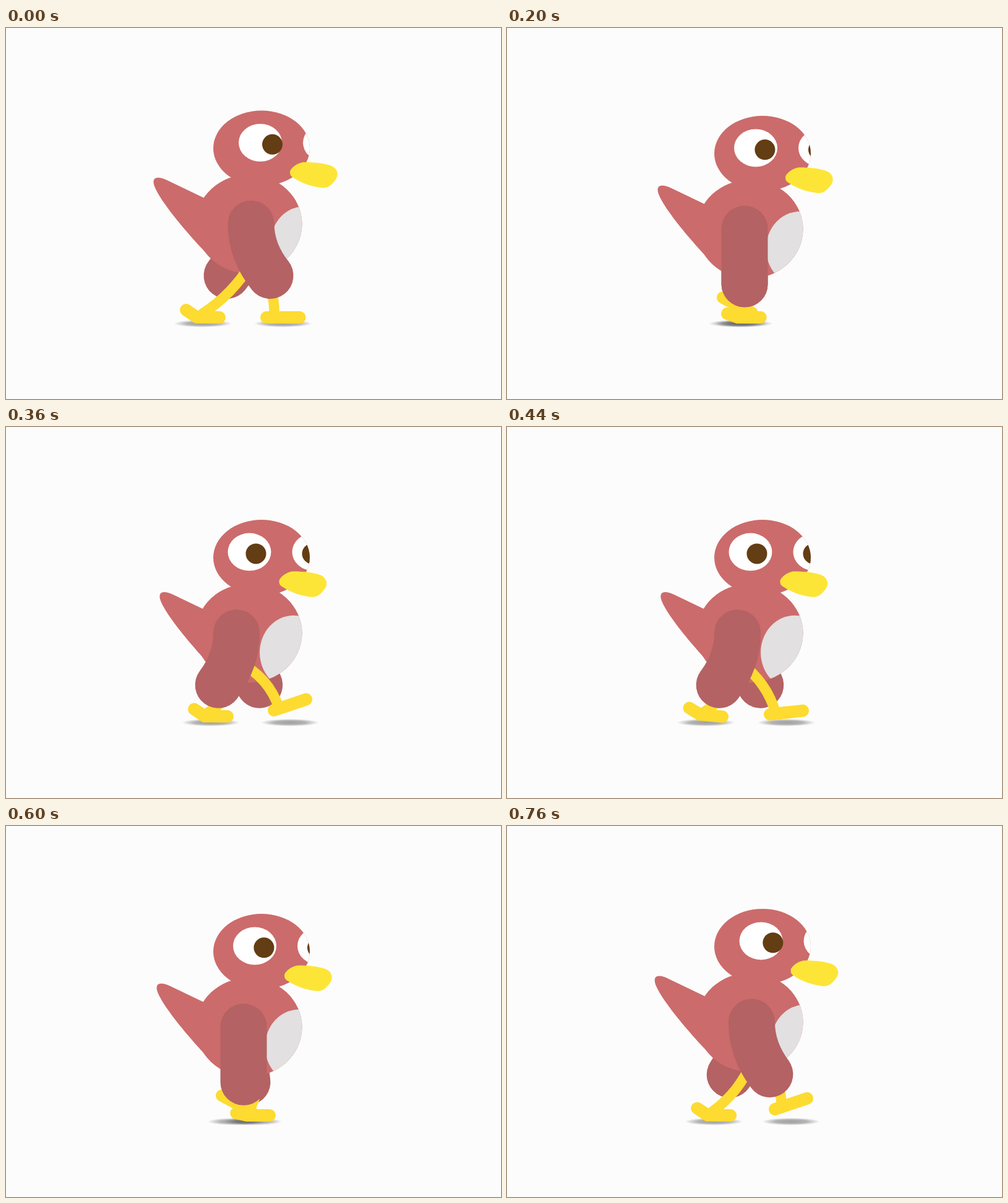
Recreate the animation shown at these times as an HTML page with a canvas. Size 800 px wide and 600 px high, loop 800 ms.

```html
<!DOCTYPE html>
<html lang="en">
<head>
<meta charset="utf-8">
<title>Walking bird</title>
<style>
  html, body { margin: 0; width: 100%; height: 100%; overflow: hidden; background: #fcfcfc; }
  canvas { display: block; }
</style>
</head>
<body>
<canvas id="stage" width="800" height="600"></canvas>
<script>
const ctx = document.getElementById('stage').getContext('2d');
const LOOP = 800, STEP = 40;
const PINK = '#cc6b6b', DARK = '#b46263', YELLOW = '#fddb30', BEAK = '#fde537',
      WHITE = '#fff', BROWN = '#633d13', BELLY = '#e2e0e1';

const tail = new Path2D('M360 294L260 246C245 239 236 241 239 253C245 275 290 330 333 374L370 370Z');
const beak = new Path2D('M459 233C459 227 472 217 482 217C500 217 515 219 526 223C535 227 538 236 534 243' +
  'C529 251 522 259 512 258.5C495 257 478 251 466 243C460 240 459 237 459 233Z');

// Foot poses: heel x, heel y, toe x, toe y, sag of the ball
const FLAT = [421, 468, 474.5, 468, 0];
const PUSH = [291, 456, 345, 468, 8];
const SWING = [
  [0, PUSH],
  [120, [315, 447, 365.5, 469.5, 0]],
  [200, [349, 436, 396, 461, 0]],
  [360, [433, 458, 485, 440.5, 0]],
];

const lerp = (a, b, p) => a + (b - a) * p;
const ease = p => (1 - Math.cos(Math.PI * p)) / 2;

// Smooth interpolation that rests at turning points
function interpolate(keys, t, channel) {
  const time = i => keys[i][0], value = i => keys[i][1][channel];
  const slope = i => {
    if (i === 0 || i === keys.length - 1) return 0;
    const before = value(i) - value(i - 1), after = value(i + 1) - value(i);
    return before * after <= 0 ? 0 : (before + after) / (time(i + 1) - time(i - 1));
  };
  let i = 0;
  while (i < keys.length - 2 && t >= time(i + 1)) i++;
  const span = time(i + 1) - time(i), p = (t - time(i)) / span;
  if (i === keys.length - 2) return lerp(value(i), value(i + 1), p);
  const h = p * p * (3 - 2 * p);
  return lerp(value(i), value(i + 1), h) +
    span * p * (1 - p) * ((1 - p) * slope(i) - p * slope(i + 1));
}

function swingPose(t, duration) {
  const keys = [...SWING, [duration, FLAT]];
  return FLAT.map((_, channel) => interpolate(keys, t, channel));
}

function stancePose(p) {
  return FLAT.map((v, i) => lerp(v, PUSH[i], i === 0 || i === 2 ? p : ease(p)));
}

function ellipse(x, y, rx, ry, color) {
  ctx.beginPath();
  ctx.ellipse(x, y, rx, ry, 0, 0, 2 * Math.PI);
  ctx.fillStyle = color;
  ctx.fill();
}

function shifted(dx, dy, draw) {
  ctx.save();
  ctx.translate(dx, dy);
  draw();
  ctx.restore();
}

function fill(path, color) {
  ctx.fillStyle = color;
  ctx.fill(path);
}

function curve(x0, y0, cx, cy, x1, y1, width, color) {
  ctx.beginPath();
  ctx.moveTo(x0, y0);
  ctx.quadraticCurveTo(cx, cy, x1, y1);
  ctx.lineWidth = width;
  ctx.strokeStyle = color;
  ctx.stroke();
}

function thigh(x, y, reach) {
  const kneeY = y + Math.sqrt(89.5 ** 2 - reach ** 2);
  curve(x, y, x, y + 45, x + reach, kneeY, 75, DARK);
}

function shadow([heelX, , toeX]) {
  shifted((heelX + toeX) / 2, 478, () => {
    ctx.scale(47, 6);
    const g = ctx.createRadialGradient(0, 0, 0, 0, 0, 1);
    g.addColorStop(0, 'rgba(0,0,0,.37)');
    g.addColorStop(0.55, 'rgba(0,0,0,.29)');
    g.addColorStop(1, 'rgba(0,0,0,0)');
    ellipse(0, 0, 1, 1, g);
  });
}

function shinAndFoot([heelX, heelY, toeX, toeY, sag], c) {
  const x = 386 + 10 * c, y = 381;
  const along = (15 + 0.11 * (x - heelX)) / 54;
  const ankleX = lerp(heelX, toeX, along), ankleY = lerp(heelY, toeY, along);
  const dx = ankleX - x, dy = ankleY - y, length = Math.hypot(dx, dy);
  const knee = Math.sqrt(Math.max(0, 53.5 ** 2 - length ** 2 / 4));
  const bulge = Math.max(13, knee) / length;
  curve(x, y, x + dx / 2 + dy * bulge, y + dy / 2 - dx * bulge, ankleX, ankleY, 16.5, YELLOW);

  ctx.beginPath();
  ctx.moveTo(heelX, heelY);
  ctx.lineTo(lerp(toeX, heelX, 0.68), lerp(toeY, heelY, 0.68) + sag);
  ctx.lineTo(toeX, toeY);
  ctx.lineWidth = 20;
  ctx.stroke();
}

function torso(bob) {
  shifted(5.1 * bob, 12.8 * bob, () => fill(tail, PINK));
  shifted(0, 8.4 * bob, () => {
    ellipse(392.5, 317, 86, 80, PINK);
    ctx.clip();
    ellipse(482.6 - 9 * bob, 348.3, 55, 60, BELLY);
  });
}

function head(bob) {
  const turn = -9 * bob;
  shifted(0, 8.5 * bob, () => {
    ctx.save();
    ellipse(413, 194.5, 78, 61, PINK);
    ctx.clip();
    ellipse(515 + turn, 185.5, 35, 30.5, WHITE);
    ellipse(512.5 + turn, 188.3, 16.5, 16.5, BROWN);
    ctx.restore();
    ellipse(411 + turn, 185.5, 35, 30.5, WHITE);
    ellipse(430.5 - 13.6 * bob, 188.3, 16.5, 16.5, BROWN);
    shifted(turn, 0, () => fill(beak, BEAK));
  });
}

function draw(t) {
  const half = LOOP / 2, land = 480;
  const c = Math.cos(2 * Math.PI * t / LOOP), bob = 1 - c;
  const hipY = 316.5 + 8.3 * bob;
  const front = t < half ? stancePose(t / half) : swingPose(t - half, half);
  const back = t < land ? swingPose(t, land) : stancePose((t - land) / (LOOP - land));

  // The far thigh returns slightly late
  const p = t / half - 1;
  const backC = p < 0 ? c : -Math.cos(Math.PI * (p - 0.1 * Math.sin(Math.PI * p * p)));

  ctx.fillStyle = '#fcfcfc';
  ctx.fillRect(0, 0, 800, 600);
  ctx.lineCap = ctx.lineJoin = 'round';
  shadow(back);
  shadow(front);
  thigh(384 + 4 * backC, hipY, -31 * backC);
  torso(bob);
  head(bob);
  shinAndFoot(back, c);
  shinAndFoot(front, c);
  thigh(384 + 12 * c, hipY, 31 * c);
}

function tick() {
  draw(Math.floor(performance.now() % LOOP / STEP) * STEP);
  requestAnimationFrame(tick);
}
tick();
</script>
</body>
</html>
```
